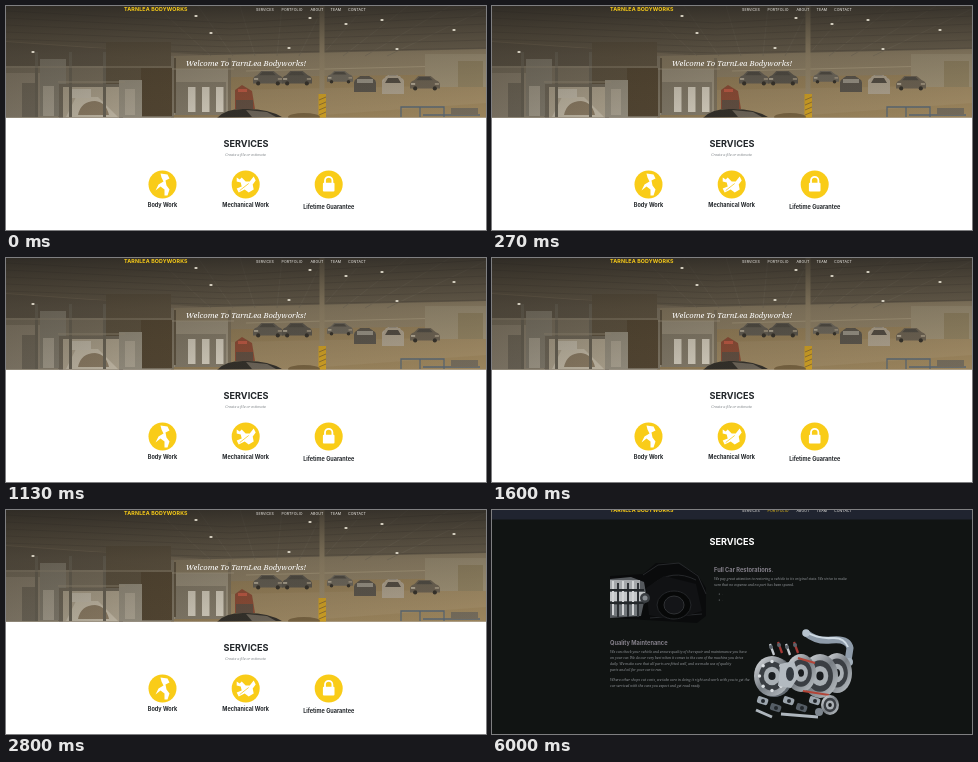
Animation, 480 px wide and 224 px high, one loop 8000 ms. Source, as an HTML page:

```html
<!DOCTYPE html>
<html lang="en">
<head>
<meta charset="utf-8">
<title>Body shop site</title>
<style>
html, body { margin: 0; width: 100%; height: 100%; overflow: hidden; background: #fff; }
#stage { display: block; width: 100vw; height: 100vh; }
text { font-family: Inter, "Open Sans", sans-serif; }
.b { font-weight: 700; }
.i { font-family: "Noto Serif", serif; font-style: italic; }
</style>
</head>
<body>
<svg id="stage" viewBox="0 0 480 224" preserveAspectRatio="none">
  <defs>
    <linearGradient id="shade" x2="0" y2="1">
      <stop offset="0" stop-color="#211e1a" stop-opacity=".72"/>
      <stop offset=".45" stop-color="#3b3223" stop-opacity=".3"/>
      <stop offset="1" stop-color="#4b3d20" stop-opacity=".08"/>
    </linearGradient>
    <linearGradient id="side">
      <stop offset="0" stop-color="#25221d" stop-opacity=".35"/>
      <stop offset=".5" stop-color="#25221d" stop-opacity=".1"/>
      <stop offset="1" stop-color="#25221d" stop-opacity="0"/>
    </linearGradient>
    <linearGradient id="metal" x2="1" y2="1">
      <stop offset="0" stop-color="#e2e5e8"/>
      <stop offset=".5" stop-color="#777d83"/>
      <stop offset="1" stop-color="#c2c7cb"/>
    </linearGradient>
  </defs>
</svg>
<script>
const YELLOW = '#f9cc18', INK = '#212529';

const rect = (x, y, w, h, fill, more = '') => `<rect x="${x}" y="${y}" width="${w}" height="${h}" fill="${fill}" ${more}/>`;
const oval = (x, y, rx, ry, fill, more = '') => `<ellipse cx="${x}" cy="${y}" rx="${rx}" ry="${ry}" fill="${fill}" ${more}/>`;
const dot = (x, y, r, fill) => oval(x, y, r, r, fill);
const path = (d, fill) => `<path d="${d}" fill="${fill}"/>`;
const line = (d, color, w = 1) => `<path d="${d}" fill="none" stroke="${color}" stroke-width="${w}"/>`;
const text = (x, y, size, str, fill, cls = '', anchor = 'middle', gap = 0) =>
  `<text x="${x}" y="${y}" font-size="${size}" fill="${fill}" class="${cls}" text-anchor="${anchor}" letter-spacing="${gap}">${str}</text>`;
const at = (x, y, body, scale = 1) => `<g transform="translate(${x} ${y}) scale(${scale})">${body}</g>`;
const view = (x, y, w, h, body) => `<svg x="${x}" y="${y}" width="${w}" height="${h}" viewBox="0 0 ${w} ${h}">${body}</svg>`;
const repeat = (n, draw) => Array.from({ length: n }, (_, i) => draw(i)).join('');

function navbar(y, active) {
  const items = [['SERVICES', 250], ['PORTFOLIO', 275.5], ['ABOUT', 304.5], ['TEAM', 324.5], ['CONTACT', 342]];
  return text(118, y, 5.3, 'TARNLEA BODYWORKS', YELLOW, 'b', 'start', .15) +
    items.map(([s, x]) => text(x, y + .2, 3.6, s, s === active ? YELLOW : '#f0eeea', '', 'start', .08)).join('');
}

function parkedCar(x, y, w, color) {
  return at(x, y, path('M0 9 Q0 5 4 4 L8 0 H20 L25 4 Q29 5 29 9 V12 H0Z', color) +
    path('M6 4 L9 1 H19 L22 4Z', '#4d4b47') + rect(1, 7, 4, 1.4, '#d9d0bd') + rect(24, 7, 4, 1.4, '#b9ad98') +
    dot(5, 12, 2, '#302e2b') + dot(24, 12, 2, '#302e2b'), w / 29);
}

function workshop() {
  const lamps = [[190, 10], [205, 27], [283, 42], [304, 12], [340, 18], [376, 14], [391, 43], [448, 24], [27, 46]];
  return view(0, 0, 480, 111.5,
    rect(0, 0, 480, 112, '#857966') +
    path('M0 0 H480 V46 L240 52 L0 35Z', '#716858') +
    path('M165 50 L480 43 V72 H165Z', '#9a8c72') +
    path('M165 72 L480 68 V112 H165Z', '#a18a62') +
    path('M220 84 L480 79 V97 L290 111 H220Z', '#a7916b') +
    repeat(9, i => line(`M${150 + i * 42} 0 L${205 + i * 22} 50`, '#827969', .7)) +
    repeat(6, i => line(`M0 ${5 + i * 7} L225 ${17 + i * 6} L480 ${2 + i * 8}`, '#5f574c', .8)) +
    rect(0, 50, 168, 62, '#8d8473') +
    path('M0 36 L100 43 V60 H0Z', '#686053') +
    rect(100, 36, 65, 70, '#665b49') + rect(135, 62, 31, 48, '#594b37') +
    rect(0, 67, 52, 45, '#a69c8a') + rect(34, 53, 26, 57, '#999487') +
    rect(16, 77, 13, 34, '#827b6e') + rect(37, 80, 11, 30, '#c9c2b2') +
    rect(53, 78, 64, 34, '#80796c') + rect(57, 81, 56, 31, '#d2c7b1') +
    path('M60 111 L70 91 H92 L112 111Z', '#efe6d2') + rect(66, 83, 19, 9, '#eee7d7') +
    path('M72 109 Q75 95 89 95 Q100 96 103 109Z', '#a59379') +
    rect(113, 74, 23, 37, '#b0aa9b') + rect(119, 83, 10, 26, '#cbc3b2') +
    repeat(3, i => rect(29 + i * 34, 46, 3, 65, '#777266')) +
    rect(168, 63, 54, 46, '#aaa18e') + rect(169, 76, 51, 33, '#8f8777') +
    repeat(3, i => rect(182 + i * 14, 81, 7.5, 25, '#eee8da')) +
    rect(168, 52, 2, 55, '#645947') + rect(222, 52, 3, 54, '#867b67') +
    line('M0 61 H165 M52 76 H119 M166 63 H228', '#bbb09a', .8) +
    line('M240 65 L480 59', '#b4a689', 1) +
    rect(419, 48, 61, 33, '#a69a80') + rect(452, 55, 25, 26, '#978969') +
    parkedCar(247, 65, 30, '#66625b') + parkedCar(276, 65, 30, '#5c5953') + parkedCar(321, 65, 26, '#716d65') +
    parkedCar(348, 70, 22, '#59554f') + parkedCar(376, 69, 22, '#bbb0a0') + parkedCar(404, 70, 30, '#6e6558') +
    path('M348 86 V77 Q350 70 359 70 Q368 70 370 78 V86Z', '#5b5751') + rect(351, 73, 16, 4, '#a19d94') +
    path('M376 88 V77 L380 70 H394 L398 77 V88Z', '#b8ad9b') + path('M379 77 L382 72 H392 L395 77Z', '#514c46') +
    rect(313.5, 0, 5, 91, '#a29377') + rect(312.5, 88, 7.5, 24, '#dfac24') +
    repeat(4, i => line(`M313 ${94 + i * 5} L320 ${91 + i * 5}`, '#977632', 1)) +
    path('M229 84 L236 79 L246 85 L249 103 H229Z', '#954d38') + rect(232, 83, 9, 3, '#d05c48') + rect(230, 94, 17, 9, '#655146') +
    path('M211 112 Q219 103 237 103 Q261 102 276 111Z', '#302e2b') + path('M240 104 L261 106 L270 111 H246Z', '#716a60') +
    oval(298, 111, 16, 4, '#7b6644') +
    line('M395 111 V101 H438 V111 M414 101 V111 M417 109 H474', '#596979', 1.3) + rect(445, 102, 27, 7, '#766e60') +
    rect(0, 0, 480, 112, 'url(#side)') + rect(0, 0, 480, 112, 'url(#shade)') +
    lamps.map(([x, y]) => oval(x, y, 1.7, .9, '#dfdacb')).join(''));
}

function service(x, y, label, icon) {
  return dot(x, 178.5, 14, YELLOW) + at(x, 178.5, icon) + text(x, y, 5.5, label, INK, 'b');
}

function homePage() {
  const bodyIcon = path('M-2 -11 L5 -10 L7 -6 L3 -4 L4 1 L7 5 L5 11 H2 L2 5 L-2 2 L-7 6 L-4 0 L1 -3 L-1 -7Z', '#fff');
  const engineIcon = path('M-9 -7 L-6 -5 L-4 -7 L0 -3 L4 -3 L8 -8 L10 -4 L7 0 L8 5 L3 8 L-1 5 L-7 8 L-9 4 L-4 2 L-5 -2 L-9 -3Z', '#fff') +
    line('M-6 6 L3 -1', YELLOW, .8);
  const lockIcon = rect(-5.8, -1.7, 11.6, 8.6, '#fff', 'rx="1"') + line('M-3.7 -1 V-4 A3.7 3.7 0 0 1 3.7 -4 V-1', '#fff', 1.8);
  return rect(0, 0, 480, 224, '#fff') + workshop() + navbar(5.1) +
    text(240, 60, 7.7, 'Welcome To TarnLea Bodyworks!', '#fff', 'i') +
    text(240, 141.3, 9.1, 'SERVICES', INK, 'b') +
    text(239.5, 150.2, 3.7, 'Create a file or estimate', '#858a8e', 'i') +
    service(156.5, 201, 'Body Work', bodyIcon) +
    service(239.7, 201, 'Mechanical Work', engineIcon) +
    service(322.7, 202.5, 'Lifetime Guarantee', lockIcon);
}

const wheel = (x, y, rx, ry = rx) => oval(x, y, rx, ry, '#202226') + oval(x, y, rx * .67, ry * .67, '#979ca1') + oval(x, y, rx * .3, ry * .3, '#34383d');

const photos = {
  coupe: rect(0, 0, 78, 58, '#8b8d97') + rect(0, 0, 78, 35, '#674b46') +
    path('M0 0 H27 L0 11Z', '#8fafd2') + path('M0 5 Q8 0 16 2 L9 12 H0Z', '#66724c') +
    path('M24 0 H78 V13 H0 V11Z', '#81625b') + line('M0 12 L27 1 H78', '#4d3937', 1.2) +
    repeat(3, i => rect(5 + i * 27, 15, 20, 22, i === 1 ? '#39363a' : '#776b68')) +
    rect(31, 16, 17, 8, '#e5e9ef') + line('M33 19 H46 M34 21 H44', '#657186', .8) +
    rect(0, 27, 13, 9, '#863e39') + rect(0, 37, 78, 21, '#a0a1aa') + oval(42, 50, 33, 3, '#54565f') +
    path('M12 41 L17 34 L29 31 Q37 25 49 28 L61 35 L73 39 L74 48 L67 51 H23 L13 48Z', '#424d5c') +
    path('M29 33 Q38 28 47 30 L55 35 L30 36Z', '#15191f') + line('M18 37 L30 38 L58 38 L71 42', '#8393a6', .8) +
    path('M13 42 L26 43 L25 47 L14 46Z', '#191c20') + wheel(31, 47, 5, 6) + wheel(67, 46, 4.2, 5.5),
  sedan: rect(0, 0, 78, 58, '#837467') + rect(0, 0, 78, 24, '#59503a') +
    repeat(13, i => line(`M${i * 7 - 5} 0 L${i * 6 - 1} 25`, i % 2 ? '#79705a' : '#393a29', 2)) +
    path('M0 17 L16 6 L31 5 L46 14 L65 22 L73 29 L71 48 L57 53 L38 47 L17 43 L0 32Z', '#d5d7d5') +
    path('M15 15 L22 8 L32 8 L42 16 L25 19Z', '#424b4f') + path('M2 16 L14 8 L20 7 L13 17Z', '#394044') +
    path('M25 14 L56 10 L58 17 L33 21Z', '#3b3d3d') + path('M31 21 L55 18 L70 28 L52 29Z', '#f1f2ef') +
    path('M39 30 L69 28 L71 36 L52 43 L38 38Z', '#51514e') + path('M46 31 L65 30 L63 35 L49 37Z', '#23262a') +
    path('M35 37 L51 43 L70 38 L69 48 L57 52 L38 46Z', '#e1e2df') + line('M41 45 L58 49 L69 44', '#54504a', 1.5) +
    wheel(29, 40, 5, 8) + wheel(5, 30, 3, 6) + path('M0 44 L30 52 L50 58 H0Z', '#776557'),
  booth: rect(0, 0, 78, 58, '#b2a184') + path('M0 0 H78 V12 H0Z', '#a18f70') +
    repeat(6, i => line(`M${i * 15} 0 V58`, '#968565', .6)) +
    rect(12, 10, 59, 48, '#a9a496') + rect(0, 50, 78, 8, '#83745d') +
    repeat(3, i => rect(13 + i * 19, 20, 15, 38, '#bdb9ad') + rect(16 + i * 19, 24, 10, 30, '#f3f7f8') + rect(18 + i * 19, 27, 4, 25, '#cddde4')) +
    repeat(3, i => rect(13 + i * 25, 16, 1.5, 6, '#504938')) +
    oval(32, 6, 8, 2, '#ded6c3') + rect(5, 2, 12, 3, '#4a4540') + dot(62, 6, 5.5, '#28313e'),
  primer: rect(0, 0, 78, 58, '#cbc9bd') + rect(0, 0, 78, 23, '#dad9d1') +
    repeat(7, i => rect(i * 12, 0, 1, 25, '#b4b8b4')) + path('M0 0 L17 0 L0 16Z', '#d7d6b4') +
    rect(61, 10, 17, 34, '#94a5b4') + rect(68, 5, 4, 30, '#e5e8e7') + rect(0, 42, 78, 16, '#b5a487') +
    path('M9 30 L22 20 Q38 16 52 22 L68 31 L66 44 L57 52 L20 49 L9 42Z', '#b9bcb5') +
    path('M22 23 Q36 18 49 24 L58 31 L21 29Z', '#dcddd6') + path('M26 21 Q38 18 49 23 L46 25 L27 24Z', '#858f8f') +
    path('M11 32 Q35 29 65 35 L61 44 Q34 43 13 39Z', '#343838') +
    repeat(4, i => dot(17 + i * 13.5, 36 + i * .8, 3.3, '#c9ccc6') + dot(17 + i * 13.5, 36 + i * .8, 2, '#242929')) +
    line('M12 42 L29 46 L61 47', '#6a6c69', 2) + path('M0 46 L17 50 L10 58 H0Z', '#d4d2c8'),
  classic: rect(0, 0, 78, 58, '#787b7e') + rect(0, 0, 78, 29, '#4b4a39') +
    repeat(11, i => dot(i * 8, 4 + i % 3 * 6, 7, ['#6b684a', '#3b412f', '#8b8061'][i % 3])) +
    path('M0 0 H22 L8 14 H0Z', '#9eabb4') + rect(0, 33, 78, 25, '#747579') +
    path('M9 30 L23 25 L29 16 H56 L65 24 L74 28 L75 43 L65 48 H17 L7 42Z', '#718390') +
    path('M26 24 L31 18 H54 L60 25Z', '#2c363d') + path('M20 27 L35 24 L62 25 L57 32 L16 32Z', '#a1b3c0') +
    path('M12 32 H54 L52 40 H13Z', '#293139') + rect(24, 34, 20, 4, '#606d76') +
    dot(16, 35, 3, '#dce2e4') + dot(49, 35, 3, '#dce2e4') + line('M9 42 H53 L57 39', '#d9dfe2', 1.8) +
    wheel(62, 43, 4, 6) + wheel(13, 46, 3, 4) + rect(26, 42, 12, 4, '#a3a9aa') + rect(0, 51, 78, 7, '#5e6065'),
  truck: rect(0, 0, 78, 58, '#6f7276') + rect(0, 0, 78, 23, '#acbdd1') + path('M0 9 Q11 0 20 9 L25 22 H0Z', '#464c3e') +
    path('M51 3 Q66 -1 78 8 V22 H57Z', '#69735e') +
    path('M3 26 L21 18 L28 5 L62 4 L74 18 L78 21 V47 L65 52 L12 50 L3 42Z', '#c51e2b') +
    path('M26 17 L31 7 H58 L66 18Z', '#26292f') + path('M13 23 L33 18 L67 20 L52 26 L10 29Z', '#eb414b') +
    path('M9 29 L49 27 L52 44 L13 46Z', '#c6c9cd') + path('M15 32 L46 30 L47 40 L17 42Z', '#34343a') +
    line('M30 30 L31 44 M15 36 L48 34', '#e5e7e9', 2) + path('M4 30 L10 29 L12 37 L6 37Z', '#ecebe8') +
    path('M49 28 L57 26 L60 36 L51 37Z', '#ecebe8') + path('M6 43 L52 42 L58 45 L56 53 L13 54Z', '#a5a7aa') +
    rect(20, 46, 22, 4, '#303136') + wheel(67, 46, 5, 8) + rect(0, 55, 78, 3, '#505257')
};

function card(x, y, photo, name, note) {
  return rect(x, y, 78, 81.5, '#fff') + view(x, y, 78, 58.2, photos[photo]) +
    text(x + 39, y + 69.3, 5.5, name, INK, 'b') + text(x + 39, y + 75, 3.4, note, '#858a8e', 'i');
}

function portfolioPage() {
  return rect(0, 0, 480, 224, '#f7f8fc') +
    text(240, 27.2, 9.1, 'PORTFOLIO', INK, 'b') +
    text(240, 36, 3.5, 'View our best repairs and recent restorations here', '#858a8e', 'i') +
    card(118, 51, 'coupe', 'Oriv K4', 'Body Work') +
    card(201, 51, 'sedan', 'Nerox TD250', 'Body &amp; Mechanical Work') +
    card(284, 51, 'booth', 'Spray Booth', 'Body Work') +
    card(118, 138, 'primer', 'Halvoria', 'Full Restoration') +
    card(201, 138, 'classic', 'Bramlok', 'Full Restoration') +
    card(284, 138, 'truck', 'Truck', 'Mechanical');
}

function engineBay() {
  return path('M118 66 L151 64 L164 53 H185 L205 64 L214 78 V106 L205 113 L118 108Z', '#0a0b0c') +
    line('M151 65 L166 55 L187 53 L206 66 L214 84 M160 75 Q180 58 204 70 M158 108 L210 104', '#26282b', 1) +
    path('M154 78 L172 66 L204 74 L210 101 L181 110 L157 105Z', '#111214') +
    oval(182, 95, 17, 14, '#070808', 'stroke="#242629"') + oval(182, 95, 10, 9, '#141518', 'stroke="#303235"') +
    path('M118 69 L139 67 L152 72 L154 83 L149 106 L118 108Z', '#55595d') +
    rect(118, 70, 30, 9, '#a4a7aa') + rect(118, 82, 35, 9, '#c2c5c7') + rect(120, 95, 25, 11, '#72777b') +
    repeat(6, i => rect(120 + i * 5, 71 + i % 2 * 2, 2, 34, i % 2 ? '#2b2f33' : '#d1d3d5')) +
    line('M118 80 H152 M118 93 H153', '#23272a', 2) + dot(153, 88, 5, '#3b3f43') + dot(153, 88, 2.5, '#878c91');
}

function brakeParts() {
  const disc = (x, y, rx, ry) => oval(x, y, rx, ry, 'url(#metal)') + oval(x, y, rx * .72, ry * .72, '#3a3e43') +
    oval(x, y, rx * .46, ry * .46, '#a9afb4') + oval(x, y, rx * .2, ry * .2, '#191c1f');
  return line('M314 123 Q325 132 339 130 Q356 128 358 138 L356 151', '#8e9ba9', 7) +
    line('M314 122 Q326 129 340 128 Q352 127 356 137', '#d0dbe4', 2) + dot(314, 123, 3.8, '#b6c2cd') + dot(357, 152, 4, '#a4b0bb') +
    repeat(4, i => at(280 + i * 8, 137 - i % 2 * 2, line('M-2 -3 L2 8', i % 2 ? '#a43834' : '#c6cbd0', 2.3) + dot(-1, 0, 2, '#5b6269'))) +
    disc(345, 163, 15, 20) + disc(328, 166, 18, 22) + disc(309, 163, 15, 19) +
    line('M306 148 L323 153 M311 181 L337 185', '#b24538', 2) +
    oval(282, 167, 19, 20, '#636a71') + disc(280, 166, 18, 20) +
    repeat(8, i => dot(280 + 12.5 * Math.cos(i * Math.PI / 4), 166 + 14.5 * Math.sin(i * Math.PI / 4), 1.7, '#dce0e3')) +
    path('M288 154 L302 151 L307 166 L299 178 L286 176Z', '#b3bac0') + oval(298, 164, 4, 7, '#343a40') +
    repeat(5, i => at(270 + i * 13, 191 + i % 2 * 7, rect(-5, -4, 11, 7, i % 2 ? '#555d65' : '#9ca5ad', 'rx="2" transform="rotate(18)"') + dot(1, 0, 2, '#23282c'))) +
    disc(338, 195, 9, 10) + line('M264 200 L280 207 M289 204 L326 207', '#aeb6bd', 3) + dot(327, 202, 4, '#7d858d');
}

function detailsPage() {
  const body = '#8d9195', head = '#85808b';
  const lines = (x, y, rows) => rows.map((s, i) => text(x, y + i * 6, 3.45, s, body, 'i', 'start')).join('');
  return rect(0, 0, 480, 224, '#111413') + rect(0, 0, 480, 9.5, '#202430') + navbar(1.7, 'PORTFOLIO') +
    text(240, 35.4, 9.1, 'SERVICES', '#fff', 'b') + engineBay() +
    text(222, 62.4, 5.7, 'Full Car Restorations.', head, 'b', 'start') +
    lines(222, 70.3, ['We pay great attention to restoring a vehicle to its original state. We strive to make', 'sure that no expense and no part has been spared.']) +
    dot(227.3, 84, .55, body) + dot(227.3, 90, .55, body) + text(230, 85, 3, '.', body, '', 'start') + text(230, 91, 3, '.', body, '', 'start') +
    text(118, 135, 5.7, 'Quality Maintenance', head, 'b', 'start') +
    lines(118, 143, ['We can check your vehicle and ensure quality of the repair and maintenance you have', 'on your car. We do our very best when it comes to the care of the machine you drive', 'daily. We make sure that all parts are fitted well, and we make use of quality', 'parts and oil for your car to run.']) +
    lines(118, 171, ['Where other shops cut costs, we take care in doing it right and work with you to get the', 'car serviced with the care you expect and get road ready.']) +
    brakeParts();
}

const LOOP = 8000;
const scenes = [[0, homePage], [3000, portfolioPage], [6000, detailsPage]];
const stage = document.getElementById('stage');
scenes.forEach(([start, draw], i) => {
  const group = document.createElementNS(stage.namespaceURI, 'g');
  group.innerHTML = draw();
  stage.append(group);
  if (i === 0) return;
  const easing = 'steps(1, end)';
  group.animate([
    { visibility: 'hidden', offset: 0, easing },
    { visibility: 'visible', offset: start / LOOP, easing },
    { visibility: 'visible', offset: 1 }
  ], { duration: LOOP, iterations: Infinity }).startTime = 0;
});
</script>
</body>
</html>
```
